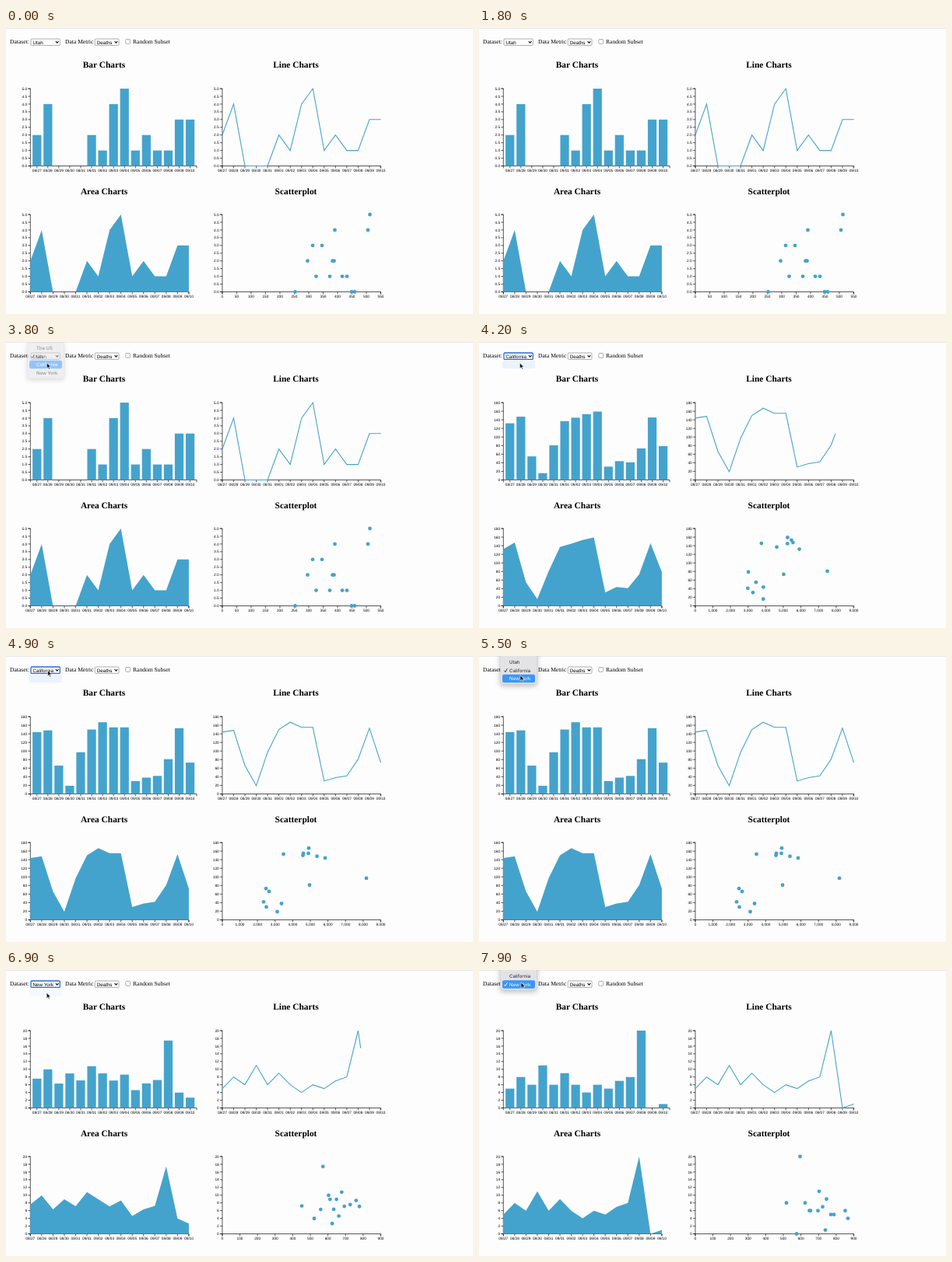
Write an HTML page that moves like this. It is 600 px wide and 368 px high and loops after 8 s.

```html
<!DOCTYPE html>
<html lang="en">
<head>
<meta charset="utf-8">
<title>Chart dashboard</title>
<style>
  html, body { margin: 0; width: 100%; height: 100%; overflow: hidden; background: #fefdfe; }
  svg { display: block; width: 600px; height: 368px; text-rendering: geometricPrecision; }
  .label { font: 7.55px "Liberation Serif", serif; }
  .title { font: bold 11.4px "Liberation Serif", serif; text-anchor: middle; }
  .control { font: 6.25px "Liberation Sans", sans-serif; }
  .tick { font: 4.75px "Liberation Sans", sans-serif; }
  .axis { fill: none; stroke: #111; stroke-width: .7; }
  .box { fill: #fff; stroke: #777; stroke-width: .6; }
  .chevron { fill: none; stroke: #111; stroke-width: 1.1; }
  .mark { fill: #44a3cc; }
  .line { fill: none; stroke: #44a3cc; stroke-width: 1.1; }
  .menu { font: 6px Inter, sans-serif; }
  .sheet { fill: #e3e2e5; stroke: #c4c3c6; stroke-width: .4; filter: drop-shadow(0 2px 3px rgba(0,0,0,.25)); }
</style>
</head>
<body>
<svg id="stage" viewBox="0 0 600 368"></svg>
<script>
const LOOP = 8000, TRANSITION = 500;
const HEIGHT = 99.5, WIDTH = 203.6, TICK = 2.8;
const LEFT = 31.3, RIGHT = 277.9, UPPER = 177.5, LOWER = 339.5;
const BAND_WIDTH = 213.7, BAND = BAND_WIDTH / 15.2;
const ITEM = 10.5, SELECT_Y = 18.4;

// Scatter positions (sx) are horizontal stage coordinates, one per day.
const sets = [
  { start: 0, name: "Utah", max: 5, step: .5, xMax: 550, xStep: 50,
    values: [2, 4, 0, 0, 0, 2, 1, 4, 5, 1, 2, 1, 1, 3, 3],
    sx: [419.5, 422.5, 444, 448, 371.5, 387.5, 432, 465, 467.5, 438, 421.5, 416, 398.5, 394, 406] },
  { start: 3875, name: "California", max: 180, step: 20, xMax: 9000, xStep: 1000,
    values: [144, 148, 66, 19, 97, 150, 167, 155, 155, 30, 38, 42, 81, 153, 73],
    sx: [410, 399.5, 338, 348.5, 463, 381.5, 389, 388.5, 382, 334.5, 354, 331, 390, 356.5, 334] },
  { start: 6595, name: "New York", max: 20, step: 2, xMax: 900, xStep: 100,
    values: [5, 8, 6, 11, 6, 9, 6, 4, 6, 5, 7, 8, 20, 0, 1],
    sx: [452, 419, 424.5, 437, 426, 446.5, 435.5, 474, 470.5, 456, 441.5, 395, 412.5, 408, 445] }
];
sets.forEach(s => s.heights = s.values.map(v => v / s.max * HEIGHT));

const options = ["The US", "Utah", "California", "New York"];
const menus = [
  { open: 2960, fade: 3720, close: 3900, selected: 1 },
  { open: 5200, fade: 6430, close: 6590, selected: 2 },
  { open: 7860, fade: 8000, close: 8100, selected: 3 }
];
const clicks = [[2780, 2960], [5030, 5200], [7680, 7860]];
const cursorPath = [
  [1700, 44, -10], [2400, 53.7, 17], [3000, 53.7, 17], [3600, 52.4, 26.7], [4600, 52.4, 27],
  [5000, 53.8, 17], [5200, 53.8, 17], [5500, 53, 24.7], [6400, 52.2, 29.2],
  [7350, 52.2, 29.2], [7650, 54, 16], [8000, 54, 16]
];
const days = Array.from({ length: 15 }, (_, i) =>
  i < 5 ? `08/${27 + i}` : `09/${String(i - 4).padStart(2, "0")}`);

const stage = document.getElementById("stage");

function add(parent, tag, attrs = {}, text) {
  const node = document.createElementNS("http://www.w3.org/2000/svg", tag);
  set(node, attrs);
  if (text !== undefined) node.textContent = text;
  parent.appendChild(node);
  return node;
}
function set(node, attrs) {
  for (const key in attrs) node.setAttribute(key, attrs[key]);
}
const write = (parent, cls, x, y, text, anchor = "start") =>
  add(parent, "text", { class: cls, x, y, "text-anchor": anchor }, text);
const show = (node, visible) => set(node, { visibility: visible ? "visible" : "hidden" });
const mix = (a, b, p) => a + (b - a) * p;
const clamp = p => Math.min(1, Math.max(0, p));
const cubicInOut = p => p < .5 ? 4 * p ** 3 : 1 - 4 * (1 - p) ** 3;
const dayX = (left, i) => left + WIDTH * i / 14;

function dropdown(x, width) {
  const box = add(stage, "rect", { class: "box", x, y: 14, width, height: 8.4, rx: 1.2 });
  const text = write(stage, "control", x + 2.5, 20.5, "");
  const right = x + width;
  add(stage, "path", { class: "chevron", d: `M${right - 5.4} 17.2l1.8 1.9 1.8-1.9` });
  return { box, text };
}

// Static page
add(stage, "rect", { width: 600, height: .8, fill: "#e4e3e5" });
write(stage, "label", 5, 20.3, "Dataset:");
write(stage, "label", 76, 20.3, "Data Metric");
write(stage, "label", 163, 20.3, "Random Subset");
const datasetSelect = dropdown(32, 37.3);
dropdown(114.2, 30.8).text.textContent = "Deaths";
add(stage, "rect", { class: "box", x: 153.8, y: 14.5, width: 5.8, height: 5.8, rx: 1 });
[["Bar Charts", 126, 51.3], ["Line Charts", 372.5, 51.3],
 ["Area Charts", 126, 213.6], ["Scatterplot", 372.5, 213.6]]
  .forEach(([text, x, y]) => add(stage, "text", { class: "title", x, y }, text));

// Charts
const axes = add(stage, "g");
const bars = days.map((_, i) => add(stage, "rect",
  { class: "mark", x: LEFT + BAND * (i + .2), width: BAND * .8 }));
const line = add(stage, "path", { class: "line", pathLength: 1 });
const area = add(stage, "path", { class: "mark" });
const dots = days.map(() => add(stage, "circle", { class: "mark", r: 2.4 }));

function yAxis(x, base, data) {
  let d = `M${x - TICK} ${base - HEIGHT}H${x}V${base}H${x - TICK}`;
  for (let v = 0; v <= data.max; v += data.step) {
    const y = base - v / data.max * HEIGHT;
    d += `M${x - TICK} ${y}H${x}`;
    write(axes, "tick", x - 4.2, y + 1.6, data.step < 1 ? v.toFixed(1) : v, "end");
  }
  add(axes, "path", { class: "axis", d });
}
function xAxis(x, base, width, ticks) {
  let d = `M${x} ${base + TICK}V${base}H${x + width}V${base + TICK}`;
  for (const [tx, text] of ticks) {
    d += `M${tx} ${base}v${TICK}`;
    write(axes, "tick", tx, base + 7.6, text, "middle");
  }
  add(axes, "path", { class: "axis", d });
}
function drawAxes(data) {
  axes.replaceChildren();
  for (const x of [LEFT, RIGHT]) for (const base of [UPPER, LOWER]) yAxis(x, base, data);
  xAxis(LEFT, UPPER, BAND_WIDTH, days.map((day, i) => [LEFT + BAND * (i + .6), day]));
  xAxis(RIGHT, UPPER, WIDTH, days.map((day, i) => [dayX(RIGHT, i), day]));
  xAxis(LEFT, LOWER, WIDTH, days.map((day, i) => [dayX(LEFT, i), day]));
  const ticks = [];
  for (let v = 0; v <= data.xMax; v += data.xStep)
    ticks.push([RIGHT + v / data.xMax * WIDTH, v.toLocaleString("en-US")]);
  xAxis(RIGHT, LOWER, WIDTH, ticks);
}
const points = (left, base, heights) =>
  heights.map((h, i) => `${dayX(left, i)} ${base - h}`).join("L");

let current = -1;
function selectDataset(index) {
  if (index === current) return;
  current = index;
  const data = sets[index];
  drawAxes(data);
  set(line, { d: "M" + points(RIGHT, UPPER, data.heights) });
  datasetSelect.text.textContent = data.name;
  datasetSelect.box.style.cssText = index ? "stroke:#2a6bd4;stroke-width:1.3" : "";
}
function drawCharts(time) {
  const index = sets.findLastIndex(s => time >= s.start);
  selectDataset(index);
  const data = sets[index], from = sets[Math.max(0, index - 1)];
  const p = index ? cubicInOut(clamp((time - data.start) / TRANSITION)) : 1;
  const heights = data.heights.map((h, i) => mix(from.heights[i], h, p));
  heights.forEach((h, i) => {
    set(bars[i], { y: UPPER - h, height: h });
    set(dots[i], { cx: mix(from.sx[i], data.sx[i], p), cy: LOWER - h });
  });
  set(area, { d: `M${LEFT} ${LOWER}L${points(LEFT, LOWER, heights)}V${LOWER}Z` });
  set(line, { "stroke-dasharray": p < 1 ? `${p} 2` : "none" });
  show(line, p > .001);
}

// Popup menu, click ring and pointer
const menu = add(stage, "g", { class: "menu" });
const sheet = add(menu, "rect", { class: "sheet", x: 27.2, width: 47.3, rx: 3.5 });
const highlight = add(menu, "rect",
  { x: 30, width: 42, height: ITEM, rx: 2.2, fill: "#3a97f9" });
const items = options.map(text => write(menu, "", 39, 0, text));
const check = add(menu, "path", { fill: "none", "stroke-width": .9,
  d: `M32.3 ${SELECT_Y + .3}l1.5 1.9 2.6-4.4` });
const ring = add(stage, "circle", { cx: 54, cy: 18, r: 9.4, fill: "#fff",
  "fill-opacity": .75, stroke: "#111", "stroke-width": 1.6 });
const pointer = add(stage, "path", { fill: "#111", stroke: "#fff", "stroke-width": .6,
  d: "M0 0V7.2L1.7 5.7 2.8 8.2 4 7.7 2.9 5.2H5.1Z" });

function cursorAt(time) {
  const next = cursorPath.findIndex(k => k[0] > time);
  if (next < 1) return cursorPath[0].slice(1);
  const a = cursorPath[next - 1], b = cursorPath[next];
  const p = (time - a[0]) / (b[0] - a[0]);
  const eased = p * p * (3 - 2 * p);
  return [mix(a[1], b[1], eased), mix(a[2], b[2], eased)];
}
function drawMenu(time, cursorY) {
  const state = menus.find(m => time >= m.open && time < m.close);
  show(menu, state);
  if (!state) return;
  const { selected, fade, close } = state;
  const center = i => SELECT_Y + (i - selected) * ITEM;
  const active = Math.min(3, Math.max(0, selected + Math.round((cursorY + .8 - SELECT_Y) / ITEM)));
  const blink = time >= fade - 50 && time < fade;
  const color = i => i === active && !blink ? "#fff" : "#222";
  set(menu, { opacity: 1 - clamp((time - fade) / (close - fade)) });
  set(sheet, { y: center(0) - 7.7, height: 3 * ITEM + 15.2 });
  set(highlight, { y: center(active) - ITEM / 2 });
  show(highlight, !blink);
  items.forEach((item, i) => set(item, { y: center(i) + 2.2, fill: color(i) }));
  set(check, { stroke: color(selected) });
}

function render() {
  const time = performance.now() % LOOP;
  const [x, y] = cursorAt(time);
  drawCharts(time);
  drawMenu(time, y);
  show(ring, clicks.some(([from, to]) => time >= from && time < to));
  set(pointer, { transform: `translate(${x} ${y})` });
  requestAnimationFrame(render);
}
render();
</script>
</body>
</html>
```
